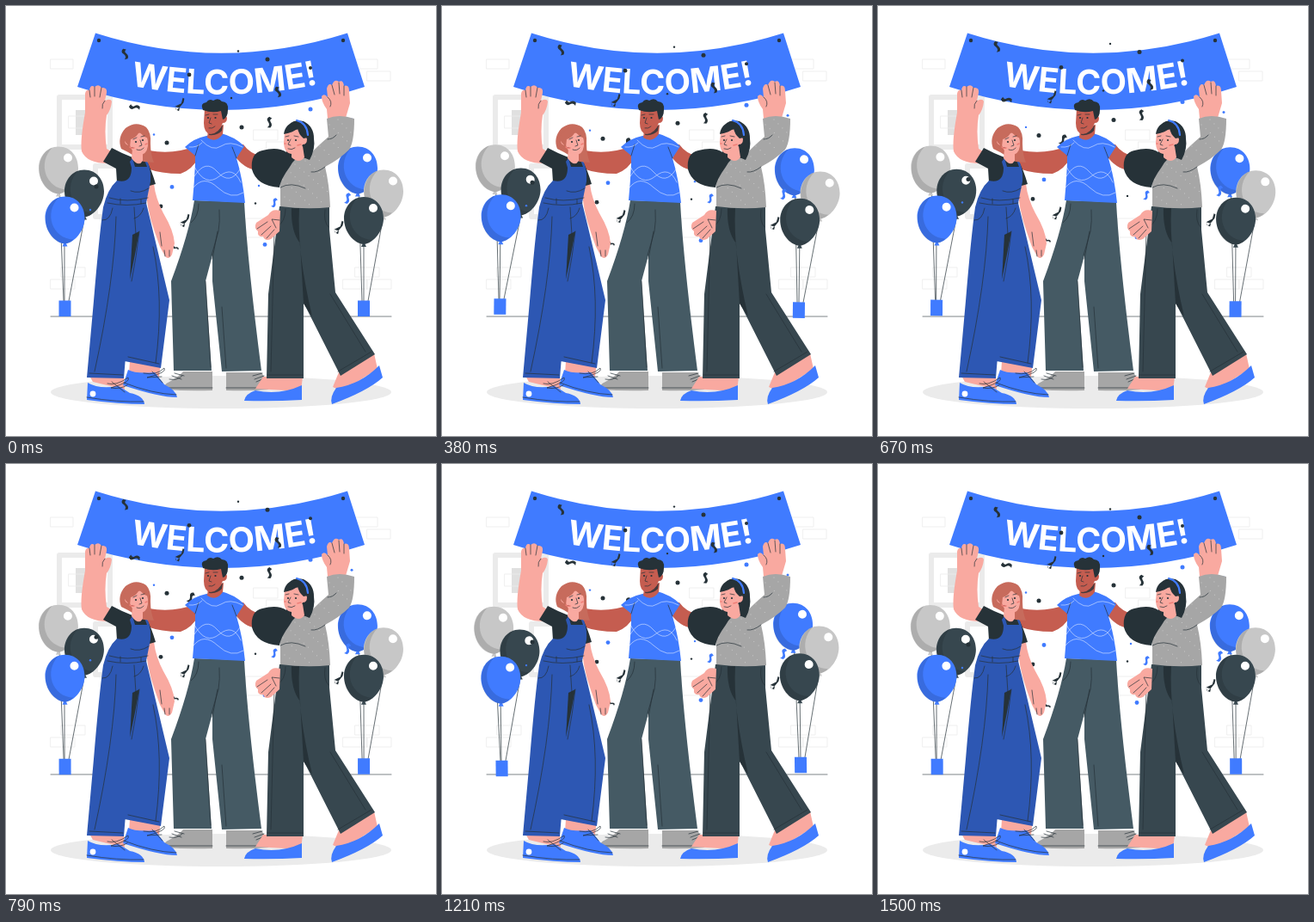
Animation, 500 px wide and 500 px high, one loop 1540 ms. Source, as an HTML page:

```html
<!DOCTYPE html>
<html lang="en">
<head>
<meta charset="utf-8">
<title>Welcome</title>
<style>
html, body { margin: 0; width: 100%; height: 100%; overflow: hidden; background: #fff; }
svg { display: block; width: 100vw; height: 100vh; }
path { stroke-linejoin: round; stroke-linecap: round; }
.blue { fill: #407bff; }
.navy { fill: #2d57b3; }
.dark { fill: #263238; }
.slate { fill: #37474f; }
.steel { fill: #455a64; }
.grey { fill: #a6a6a6; }
.pink { fill: #f9a9a0; }
.brown { fill: #c55d50; }
.hair { fill: #c76b5c; }
.line { fill: none; stroke: #263238; stroke-width: .7; }
.white { fill: none; stroke: #fff; stroke-width: .5; }
.brick { fill: none; stroke: #ebebeb; stroke-width: .8; }
.shade { fill: #000; opacity: .13; }
</style>
</head>
<body>
<svg viewBox="0 0 500 500">
  <g fill="none" stroke="#ebebeb" stroke-width="6">
    <path d="M62 106H121V164H62ZM104 186H150V245H104Z"/>
    <path d="M81 121H96V150H81Z" fill="#e0e0e0" stroke="none"/>
  </g>
  <path class="brick" d="M52 62h26v11h-26zM406 62h26v11h-26zM420 76h27v11h-27zM73 128h26v14h-26zM288 144h28v12h-28zM303 158h27v11h-27zM279 247h28v22h-28zM64 304h28v11h-28zM52 318h28v11h-28zM406 304h28v11h-28zM392 318h28v11h-28zM420 318h28v11h-28z"/>
  <path d="M52 361H448" stroke="#263238" stroke-width=".6"/>
  <ellipse cx="250" cy="449" rx="198" ry="19" fill="#ebebeb"/>

  <g id="left"></g>
  <g id="right"></g>

  <g id="banner">
    <path class="blue" d="M104 31.5Q250 78 397 31.5L417 94Q250 148 83 94Z"/>
    <circle class="dark" cx="108" cy="40" r="2.2"/>
    <circle class="dark" cx="392" cy="40" r="2.2"/>
    <path id="arc" d="M120 87Q250 119 385 86" fill="none"/>
    <text font-family="Inter, sans-serif" font-weight="700" font-size="39.5" fill="#fff" text-anchor="middle"><textPath href="#arc" startOffset="50.5%">WELCOME!</textPath></text>
  </g>

  <g id="confetti"></g>

  <g id="man">
    <path class="brown" d="M220 163Q195 173 166 168L164 189Q180 195 203 195Q217 190 224 176ZM264 160L276 161Q283 171 297 175L292 191Q276 189 266 174Z"/>
    <path class="steel" d="M219 226L277 228Q281 300 297 424L251 425L240 320V290L232 320L239 424L195 424L192 320Q213 264 219 226Z"/>
    <path class="line" d="M239 290L247 262Q249 250 248 237M246 262L240 294M224 230Q224 245 215 252M232 320L238 420M251 350L256 421"/>
    <path class="blue" d="M233 151Q218 154 208 164L220 174L220 183Q219 205 217 226L278 229Q275 200 268 177L277 163Q266 152 250 148Z"/>
    <path class="line" d="M220 174L224 161M268 177L263 164"/>
    <path class="white" d="M227 156Q240 170 250 163T275 164M213 164Q222 165 228 159M219 198Q232 177 246 193T272 190M219 187Q232 211 248 198T273 205M218 211Q230 196 246 211T276 217"/>
    <path class="brown" d="M235 145L234 153Q244 160 252 149L253 138Z"/>
    <path class="dark" d="M237 147Q247 147 252 138L251 145Q246 151 236 150Z" opacity=".8"/>
    <path class="brown" d="M231 119L230 136Q230 148 238 149Q248 148 252 136Q257 136 257 130Q256 126 252 128L252 116Z"/>
    <path class="dark" d="M229 121Q225 113 233 112Q236 107 241 110Q247 106 251 111Q259 111 258 121Q258 130 252 132L250 122Q240 125 229 121Z"/>
    <g class="dark"><circle cx="235" cy="130" r="1.1"/><circle cx="243.5" cy="130" r="1.1"/></g>
    <path class="line" d="M232 127L236 126M241 126L246 126M238 130L236 136L239 137M236 142Q240 143 243 140"/>
    <path class="grey" d="M195 425H240V447Q212 448 185 446Q182 440 190 437Q201 431 206 425ZM256 426H297Q300 432 304 435Q308 440 305 446Q281 448 256 447Z"/>
    <path class="line" d="M190 434Q199 436 205 430M193 430L204 434M196 427L207 430M287 430L298 427M289 434L300 430M291 437L303 432M186 444H240M256 444H305"/>
  </g>

  <g id="girl">
    <path class="pink" d="M164 198Q169 190 172 207Q174 224 183 241Q195 261 196 276L193 289Q189 296 185 291L179 280L173 263Q163 235 162 205Z"/>
    <path class="line" d="M179 263L181 279M185 291L184 284M190 291L190 284"/>
    <path class="pink" d="M101 437L97 430H137L138 446ZM144 413H180L178 431L143 428Z"/>
    <path class="blue" d="M142 423Q151 428 173 426L184 440Q198 447 199 455Q178 455 136 441ZM95 438Q108 446 131 442L144 450Q160 453 161 463Q132 463 94 458Z"/>
    <path class="line" d="M94 455Q130 461 160 460M137 438Q170 451 198 452M118 439Q128 442 142 432Q146 437 122 444Q132 446 141 441M123 437L138 449M160 427Q175 430 184 421Q188 426 164 432L181 431M170 425L182 438"/>
    <circle cx="101" cy="451" r="3.4" fill="#fff"/>
    <path class="pink" d="M117 127Q114 145 117 166L126 171L119 183Q94 183 88 169Q86 157 92 124L92 102Q93 97 97 98Q98 91 103 94Q108 90 111 95Q118 94 117 101L115 110Q122 107 123 111Q122 121 117 127Z"/>
    <path class="line" d="M97 98L98 106M103 94L103 105M111 95L109 106M115 110Q111 114 112 119"/>
    <path class="dark" d="M123 165Q134 171 147 176L163 179Q169 190 174 207L167 209L164 202L148 207L129 205L128 189L113 181Z"/>
    <path class="navy" d="M144 181L147 177L150 187L164 187L161 179L164 180Q169 190 168 204L163 229L171 262L190 342L180 421L138 413L146 320L137 433L94 432L102 343Q108 270 113 234Q118 213 129 203Q146 207 146 188Z"/>
    <path class="dark" d="M155 262L147 266L144 318Q150 290 155 262Z"/>
    <path class="line" d="M120 223Q140 229 165 223M118 229Q140 234 163 229M133 224V230M157 225V230M124 235Q121 250 112 249M160 235Q157 245 149 247M149 234L151 266M145 215Q155 219 166 212M128 245Q126 320 103 425M155 262Q152 290 146 320M171 280Q184 340 174 415M97 427L136 429M142 408L178 416"/>
    <path class="hair" d="M134 166Q129 153 139 142Q151 133 163 141Q169 147 168 160Q168 172 172 182L160 181L142 170Z"/>
    <path class="pink" d="M147 166L146 177Q154 188 159 180L159 169Z"/>
    <path class="pink" d="M143 153Q139 151 138 156Q138 162 144 162Q148 174 158 173Q166 170 165 157L163 148Q152 146 143 153Z"/>
    <path class="hair" d="M136 154Q143 138 160 141Q166 145 166 154Q158 151 155 146Q152 153 145 155L144 164Q139 159 136 154Z"/>
    <g class="dark"><circle cx="151" cy="158" r="1.1"/><circle cx="159" cy="156" r="1.1"/></g>
    <path class="line" d="M148 155L152 153M157 152L161 151M156 156L158 162L155 163M152 167Q157 169 160 165"/>
    <path d="M144 164q2 2 5 1M162 161l2-1" stroke="#ef7f77" stroke-width="1.5"/>
  </g>

  <g id="woman">
    <path class="pink" d="M299 431H345L343 448L290 445ZM389 421L428 404L432 422L391 448L380 443Z"/>
    <path class="blue" d="M344 441L344 458Q310 460 277 459Q278 451 290 447Q318 453 344 441ZM434 418L438 432Q420 448 379 463Q376 455 384 444Q412 440 434 418Z"/>
    <path class="slate" d="M318 233H376L376 260L383 333L429 405L389 430L346 345V433H303L305 335Z"/>
    <path class="dark" d="M332 235H341Q338 285 356 361L346 346L342 276Q331 262 332 235Z"/>
    <path class="line" d="M325 236Q325 251 315 257M371 237Q369 251 375 257M312 260L308 425M377 335L418 402M304 429H345M386 425L425 402"/>
    <path class="pink" d="M319 238Q309 235 305 243L291 252Q288 258 293 262Q292 269 299 268Q301 274 308 271L318 262Z"/>
    <path class="line" d="M318 249L309 248L314 258M292 259L304 251M297 266L308 256M303 270L312 260"/>
    <path class="pink" d="M374 131L373 120Q367 112 367 105Q370 101 374 106L373 96Q375 89 379 92Q382 84 387 88Q392 85 393 93Q399 91 399 99L400 113L395 130Z"/>
    <path class="line" d="M379 92L382 103M387 89L388 102M393 93L393 104M374 106Q380 111 377 117"/>
    <path fill="#a6a6a6" d="M334 175Q322 181 319 195L319 233Q349 237 377 234Q376 207 371 187Q388 178 399 167Q405 158 405 131Q387 125 373 131L375 152Q361 164 352 174Z"/>
    <path d="M326 189L370 231M322 202L354 232M324 222L339 232M336 184L374 216M348 180L372 200M359 175L368 183M365 163L379 176M376 155L390 168M376 138L400 160M386 132L402 148" stroke="#d0d0d0" stroke-width="1" stroke-dasharray="0 7"/>
    <path class="line" d="M371 187Q362 194 355 193M319 211Q331 204 348 212M374 155Q380 155 384 150"/>
    <path class="dark" d="M325 145Q330 130 346 134Q358 140 358 154Q360 166 353 179Q338 171 330 187Q319 202 318 211Q291 209 286 190Q284 171 298 168Q316 163 326 170Z"/>
    <path class="pink" d="M332 165L332 176Q341 184 347 176L345 163Z"/>
    <path class="pink" d="M324 147L323 158Q323 171 332 172Q342 172 345 161Q350 161 350 155Q349 150 345 152L341 143Z"/>
    <path class="dark" d="M323 149Q325 134 341 136Q352 141 351 153L346 154Q340 149 339 142Q335 147 323 149Z"/>
    <path d="M338 133Q350 136 351 150" fill="none" stroke="#407bff" stroke-width="2.2"/>
    <g class="dark"><circle cx="328" cy="156" r="1.1"/><circle cx="337" cy="156" r="1.1"/></g>
    <path class="line" d="M325 152L329 151M335 151L340 152M331 155L328 161L331 162M328 166Q332 168 336 165"/>
    <path d="M339 162l4-1M324 160l1 0" stroke="#ef7f77" stroke-width="1.5"/>
  </g>
</svg>
<script>
const LOOP = 1540;
const $ = id => document.getElementById(id);
const BLUE = '#407bff', DARK = '#263238', SLATE = '#37474f', GREY = '#c7c7c7';

function balloon(x, y, color) {
  return `<g transform="translate(${x} ${y})" fill="${color}">
    <path d="M0 25L-3 31H3Z"/>
    <path d="M0 -27C15 -27 23 -15 23 -2C23 13 11 27 0 28C-12 27 -23 13 -23 -2C-23 -15 -14 -27 0 -27Z"/>
    <path class="shade" d="M-7 -26C-30 -18 -27 25 0 28C4 28 8 25 10 23C-15 22 -25 -8 -7 -26Z"/>
    <circle cx="11" cy="-14" r="5" fill="#fff"/></g>`;
}

function bunch(box, strings, balloons) {
  return `<path class="line" d="${strings}"/>
    <rect class="blue" x="${box}" y="342.5" width="14" height="18.5"/>` +
    balloons.map(b => balloon(...b)).join('');
}

$('left').innerHTML = bunch(61.5, 'M62 215L67 343M68 277V343M91 248L73 343',
  [[61, 190.5, GREY], [91, 217.5, SLATE], [68.5, 248.5, BLUE]]);
$('right').innerHTML = bunch(409, 'M410 215L414 343M416 278V343M439 243L421 343',
  [[409, 190.5, BLUE], [439, 217.5, GREY], [416, 249, SLATE]]);

const dots = [
  [304, 62, 2.5], [270, 52.5, 1.2], [213, 80, 2.4], [262, 107, 1.2], [274, 141, 2.5],
  [187, 159, 2.5], [290, 229.5, 1.2], [180, 233, 2.4], [105, 210, 2.5], [354, 72, 2],
  [354, 120, 2.5, BLUE], [172, 149.5, 1.2, BLUE], [193, 210.5, 2.4, BLUE],
  [294, 209, 1.2, BLUE], [301, 277.5, 2.4, BLUE], [98, 237, 1.2, BLUE], [402, 132, 1.5, BLUE]
];
const ribbon = 'M-1 -7Q-5 -3 0 0Q4 3 1 7L5 6Q7 2 3 -1Q0 -3 3 -6Z';
const curl = 'M4 -9L2 -2L-6 2L-4 7L1 2L5 -3L6 -8ZM-6 2L0 4L-1 8L-5 6Z';
const ribbons = [
  [137, 56, 0, ribbon], [149, 119, -65, ribbon], [202, 115, 0, curl], [315, 100, 0, ribbon],
  [305, 135, 20, ribbon], [214, 163, 50, ribbon], [208, 250, 0, curl], [197, 282, -50, ribbon, .5],
  [387, 258, 0, curl], [311, 228, 40, ribbon, .8, BLUE], [396, 223, 35, ribbon, .9, BLUE]
];
$('confetti').innerHTML =
  dots.map(([x, y, r, color = DARK]) => `<circle cx="${x}" cy="${y}" r="${r}" fill="${color}"/>`).join('') +
  ribbons.map(([x, y, turn, shape, size = .9, color = DARK]) =>
    `<path d="${shape}" fill="${color}" transform="translate(${x} ${y}) rotate(${turn}) scale(${size})"/>`).join('');

function draw(now) {
  const phase = now % LOOP / LOOP * 2 * Math.PI;
  const sway = Math.sin(phase);
  const rise = 4.4 * (1 - Math.cos(phase + .12));
  $('left').setAttribute('transform', `translate(0 ${-2.2 * sway}) rotate(${.7 * sway} 75 262)`);
  $('right').setAttribute('transform', `translate(0 ${1.9 * sway}) rotate(${.7 * sway} 424 262)`);
  $('confetti').setAttribute('transform', `translate(0 ${-rise})`);
  requestAnimationFrame(draw);
}
draw(performance.now());
</script>
</body>
</html>
```
